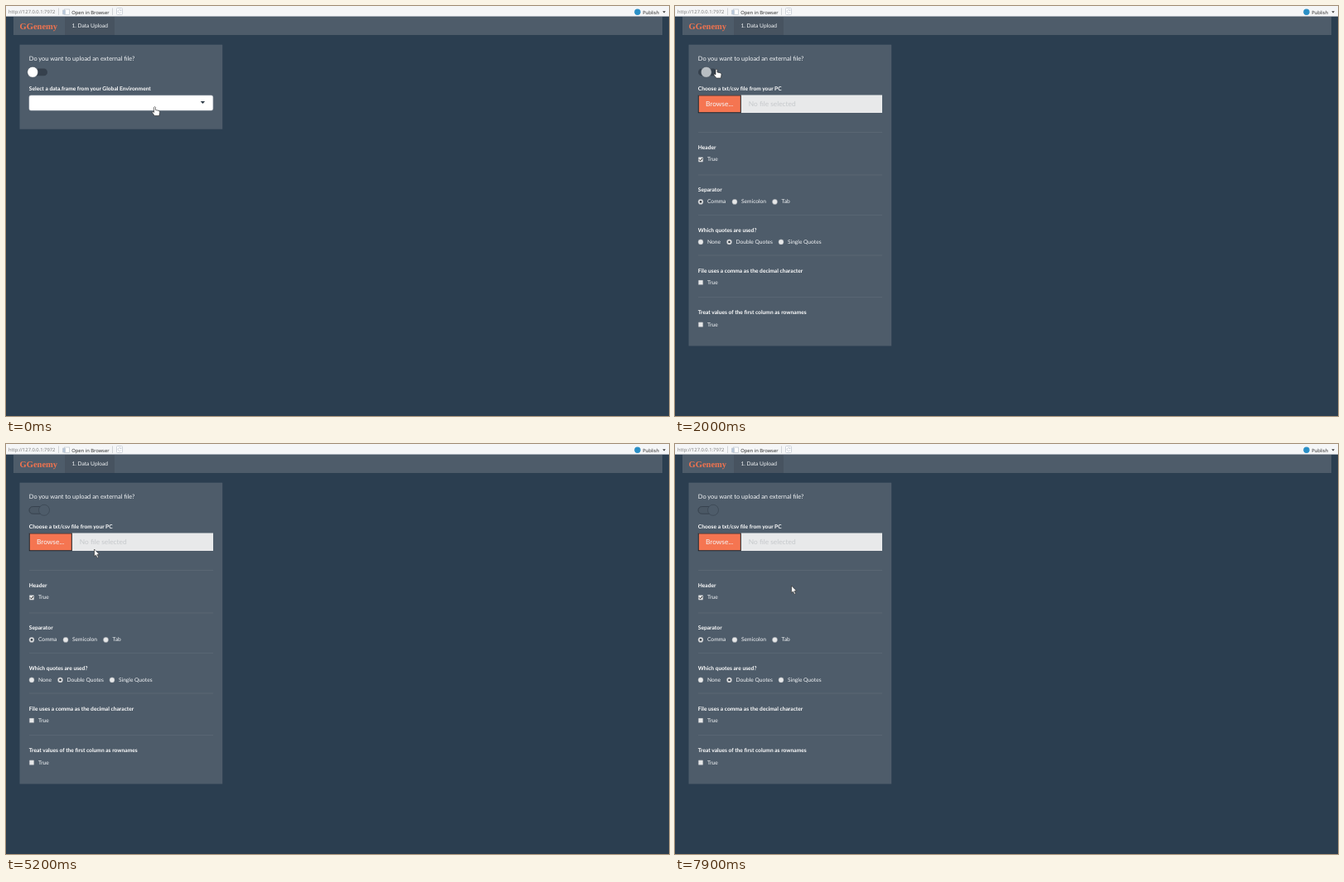
Write an HTML page that moves like this. It is 800 by 495 pixels and loops after 8 s.

```html
<!DOCTYPE html>
<html lang="en">
<head>
<meta charset="utf-8">
<title>Data upload</title>
<style>
html, body { margin: 0; width: 100%; height: 100%; overflow: hidden; background: #2b3e50; }
svg { display: block; }
text { font: 6.65px Lato, sans-serif; fill: #f4f6f8; text-rendering: geometricPrecision; white-space: pre; }
.bold { font-weight: 700; fill: #fff; }
.ask { font-size: 7.45px; }
.bar { font: 5.8px "Open Sans", sans-serif; fill: #222; }
.brand { font: bold 10.5px "Liberation Serif", serif; fill: #f0734f; }
.file { font-size: 8.35px; }
</style>
</head>
<body>
<svg width="800" height="495" viewBox="0 0 800 495">
  <rect width="800" height="12.6" fill="#f5f6f7"/>
  <text class="bar" x="3" y="9.4" style="fill:#777">http://127.0.0.1:7972</text>
  <path d="M63.5 2.500v8.500M128.500 2.500v8.500" stroke="#d0d3d6"/>
  <g fill="#fff" stroke="#c3cad2" stroke-width=".8">
    <rect x="70.500" y="4" width="6" height="6.500"/>
    <path d="M68.500 5h3v5h-3z" fill="#b9c9dc"/>
    <rect x="133.500" y="2.500" width="7" height="8" rx="1"/>
    <path d="M138.700 5.200a2 2 0 1 0 .3 2M139 4v1.600h-1.600" fill="none"/>
  </g>
  <text class="bar" x="79.300" y="9.600">Open in Browser</text>
  <circle cx="762" cy="7.200" r="3.700" fill="#2a8fc6"/>
  <text class="bar" x="768.300" y="9.600">Publish</text>
  <path d="M792.300 6.200h3.600l-1.800 2.200z" fill="#333"/>

  <rect x="9" y="13" width="783" height="22" fill="#4e5c6a"/>
  <rect x="71" y="13" width="60" height="22" fill="#475360"/>
  <text class="brand" x="16.600" y="27.500">GGenemy</text>
  <text x="79.400" y="26.200" fill="#fff">1. Data Upload</text>

  <rect id="panel" x="16.500" y="46.700" width="244.700" height="102" fill="#4e5c6a"/>
  <text class="ask" x="27.800" y="65.700">Do you want to upload an external file?</text>
  <rect id="track" x="28" y="75.600" width="22" height="8.600" rx="4.300"/>
  <circle id="thumb" cy="79.800" r="6.500" stroke="#37424e" stroke-width=".6"/>

  <g id="pick">
    <text class="bold" x="27.800" y="102.400">Select a data.frame from your Global Environment</text>
    <rect x="28" y="108" width="221.700" height="18" rx="2" fill="#fff" stroke="#d5d9dd" stroke-width=".6"/>
    <path d="M234.700 115h5.400l-2.700 3z" fill="#2d3a46"/>
  </g>
  <g id="form">
    <text class="bold" x="27.800" y="102.400">Choose a txt/csv file from your PC</text>
    <rect x="28" y="107.500" width="222" height="21.500" fill="#e8e9ea"/>
    <rect id="button" x="28.300" y="107.900" width="51" height="20.800" fill="#f57551" stroke="#1d2228"/>
    <text class="file" id="browse" x="37" y="121.300" fill="#fff">Browse...</text>
    <text class="file" id="none" y="121.300" style="fill:#c5c8cb">No file selected</text>
  </g>
  <g id="cursor" stroke="#222" stroke-width=".6" stroke-linejoin="round" fill="#fff">
    <path id="arrow" d="M0 0v8.800l2-1.900 1.500 3.500 1.500-.7-1.500-3.300h2.700z"/>
    <path id="hand" d="M-1 .9Q0-.7 1 .9V4l4 .9q1.200.4 1 1.900L5.300 11H-.2L-3 7.300q-.5-1.300 .7-1.300L-1 7z"/>
  </g>
</svg>
<script>
const $ = id => document.getElementById(id);
const form = $('form');

function add(tag, attrs, label = '') {
  const el = document.createElementNS('http://www.w3.org/2000/svg', tag);
  for (const key in attrs) el.setAttribute(key, attrs[key]);
  el.textContent = label;
  form.append(el);
}

function option(x, y, label, round, on, labelX = x + 8) {
  if (round) {
    add('circle', { cx: x, cy: y + .4, r: 3.1, fill: '#e6e7e8', stroke: '#7b848d', 'stroke-width': .4 });
    if (on) add('circle', { cx: x, cy: y + .4, r: 1.4, fill: '#3b434b' });
  } else {
    add('rect', { x: x - 2.8, y: y - 2.4, width: 5.6, height: 5.6, rx: .6, fill: '#e6e7e8', stroke: '#7b848d', 'stroke-width': .4 });
    if (on) add('path', { d: `M${x - 1.8} ${y + .4}l1.400 1.500 2.400-3`, fill: 'none', stroke: '#222' });
  }
  add('text', { x: labelX, y: y + 2.3 }, label);
}

// rule y, title y, title, options y, round, options [x, label, on]
[
  [152.5, 170.6, 'Header', 185, false, [[31, 'True', true]]],
  [204, 222, 'Separator', 236, true, [[31, 'Comma', true], [72, 'Semicolon'], [120.5, 'Tab']]],
  [252.4, 270.5, 'Which quotes are used?', 284.5, true, [[31, 'None'], [65.5, 'Double Quotes', true], [128, 'Single Quotes']]],
  [301, 319.4, 'File uses a comma as the decimal character', 333.4, false, [[31, 'True']]],
  [351.6, 370, 'Treat values of the first column as rownames', 384.2, false, [[31, 'True']]]
].forEach(([rule, top, title, y, round, items]) => {
  add('path', { d: `M28 ${rule}h222`, stroke: '#5f6b78', 'stroke-width': .7 });
  add('text', { class: 'bold', x: 27.8, y: top + 2.4 }, title);
  items.forEach(([x, label, on]) => option(x, y, label, round, on));
});

// time, x, y of the pointer tip
const path = [
  [0, 179.5, 121.5], [400, 176, 120], [1000, 110, 100], [1500, 50, 76], [2500, 50, 76],
  [3100, 56, 114.3], [4300, 56, 114.3], [5000, 106.5, 127], [5500, 106.5, 127],
  [6500, 142.5, 138], [7000, 142.5, 138], [7700, 140.5, 171], [8000, 140.5, 171]
];
const ease = p => p * p * (3 - 2 * p);
const mix = (a, b, p) => a + (b - a) * p;

function pointer(t) {
  const i = path.findIndex(key => key[0] > t);
  const [t0, x0, y0] = path[i - 1], [t1, x1, y1] = path[i];
  const p = ease((t - t0) / (t1 - t0));
  return [mix(x0, x1, p), mix(y0, y1, p)];
}

function draw(t) {
  const open = t >= 2000;
  const p = ease(Math.min(1, Math.max(0, (t - 1870) / 300)));
  const [x, y] = pointer(t);
  const inside = (l, r, top, bottom) => x > l && x < r && y > top && y < bottom;
  const hover = open && inside(28, 80, 107, 129);
  const hand = hover || inside(26, 53, 73, 87) || !open && inside(28, 250, 108, 126);
  const show = (id, on) => $(id).style.display = on ? '' : 'none';

  $('panel').setAttribute('height', open ? 363.7 : 102);
  show('pick', !open);
  show('form', open);
  show('hand', hand);
  show('arrow', !hand);
  $('cursor').setAttribute('transform', `translate(${x} ${y})`);

  $('thumb').setAttribute('cx', mix(32.2, 46, p));
  $('thumb').setAttribute('fill', `rgb(${mix(255, 78, p)},${mix(255, 92, p)},${mix(255, 106, p)})`);
  $('track').setAttribute('fill', p < 1 ? '#36414d' : '#4b5865');
  $('track').setAttribute('stroke', p < 1 ? 'none' : '#36414d');

  $('button').setAttribute('width', hover ? 51.9 : 51);
  $('browse').style.fontWeight = hover ? 700 : 400;
  $('none').setAttribute('x', hover ? 89.6 : 88.8);
}

const start = performance.now();
function tick() {
  // the picture advances in steps of 100 ms
  draw(Math.floor((performance.now() - start) % 8000 / 100) * 100);
  requestAnimationFrame(tick);
}
tick();
</script>
</body>
</html>
```
